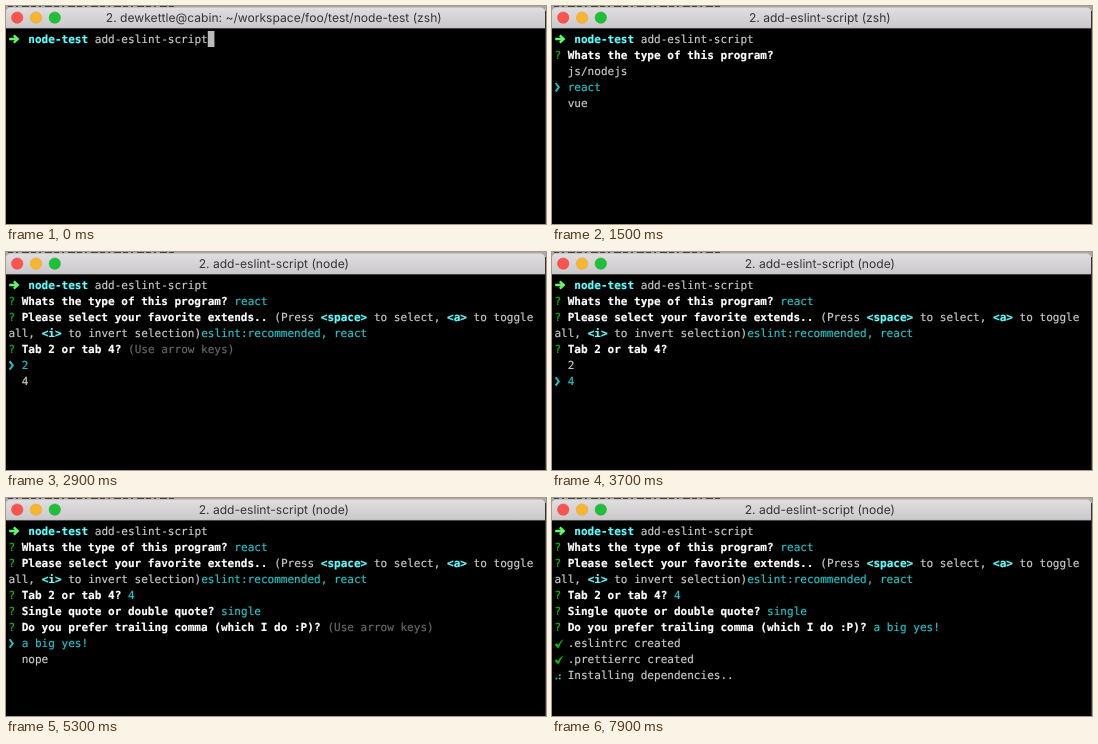
Write an HTML page that moves like this. It is 540 by 218 pixels and loops after 8 s.

```html
<!DOCTYPE html>
<html lang="en">
<head>
<meta charset="utf-8">
<title>Terminal prompt</title>
<style>
  html, body { margin: 0; width: 100%; height: 100%; overflow: hidden; background: #000; }
  svg { display: block; width: 540px; height: 218px; }
  text { white-space: pre; text-rendering: geometricPrecision; }
  #title { font: 12.1px Inter, Roboto, sans-serif; fill: #363636; text-anchor: middle; }
  #screen text {
    font: 11.04px "DejaVu Sans Mono", "Liberation Mono", monospace;
    fill: currentColor; stroke: currentColor; stroke-width: .18;
  }
  #screen .bold, #screen .path, #screen .key { font-weight: bold; }
  .plain { color: #cacaca; }
  .bold { color: #fff; }
  .dim { color: #686868; }
  .cyan { color: #20c5c9; }
  .path, .key { color: #60fdff; }
  .green { color: #00c200; }
</style>
</head>
<body>
<svg viewBox="0 0 540 218" xmlns="http://www.w3.org/2000/svg">
  <defs>
    <linearGradient id="bar" x2="0" y2="1">
      <stop offset="0" stop-color="#e0dee0"/>
      <stop offset="1" stop-color="#cac8ca"/>
    </linearGradient>
  </defs>
  <rect width="540" height="218"/>
  <rect width="540" height="6" fill="#a9a9a9"/>
  <path d="M2 .5H170" stroke="#444" stroke-dasharray="5 3 2 4 7 2"/>
  <path d="M0 22V6Q0 1.5 5 1.5H534Q539 1.5 539 6V22Z" fill="url(#bar)"/>
  <path d="M0 22.2H539" stroke="#aaa" stroke-width=".6"/>
  <path d="M539.5 5V218" stroke="#333"/>
  <g stroke-width=".5">
    <circle cx="11.2" cy="11.6" r="5.7" fill="#fb534d" stroke="#df4744"/>
    <circle cx="30" cy="11.6" r="5.7" fill="#f8b62f" stroke="#de9f34"/>
    <circle cx="48.8" cy="11.6" r="5.7" fill="#20bf38" stroke="#1fa830"/>
  </g>
  <text id="title" x="267.8" y="16.2"></text>
  <g id="screen"></g>
</svg>
<script>
const LOOP = 8000, STEP = 100;
const LEFT = 2.4, COL = 6.646, TOP = 25, ROW = 16.07, BASE = 11.8;
const SPINNER = "⠋⠙⠹⠸⠼⠴⠦⠧⠇⠏", SPIN_START = 5733, SPIN_MS = 85;

const title = document.getElementById("title");
const screen = document.getElementById("screen");

const escapeText = s => s.replace(/&/g, "&amp;").replace(/</g, "&lt;");

// Icons are drawn around the middle of their row, from the left of their cell.
const icons = {
  arrow: () => '<path d="M.8 0H8M5.4-3.6L9.4 0L5.4 3.6" fill="none" stroke="#5ffa68" stroke-width="2.3"/>',
  pointer: () => '<path d="M1.2-4.2L4.4 0L1.2 4.2" fill="none" stroke="#20c5c9" stroke-width="1.9"/>',
  checked: () => '<circle cx="6.3" r="5" fill="none" stroke="#00c200"/><circle cx="6.3" r="3.3" fill="#00c200"/>',
  empty: () => '<circle cx="6.3" r="5" fill="none" stroke="#cacaca"/>',
  tick: () => '<path d="M.4 .9Q1.6-.6 2.6 .2L3.6 1.6Q5.6-2.6 9.2-4.4Q6.2-.4 4.4 4.2H2.6Z" fill="#00c200"/>',
  cursor: () => `<rect y="-8" width="${COL}" height="16" fill="#bbb"/>`,
  spinner: t => {
    const frame = Math.floor((t - SPIN_START) / SPIN_MS) % SPINNER.length;
    const bits = SPINNER.codePointAt(frame) - 0x2800;
    let dots = "";
    for (let i = 0; i < 6; i++) {
      if (bits >> i & 1) {
        dots += `<circle cx="${2 + 3.4 * Math.floor(i / 3)}" cy="${-3.7 + 3.3 * (i % 3)}" r="1" fill="#20c5c9"/>`;
      }
    }
    return dots;
  }
};

const icon = name => ({ icon: name });
const span = (style, text) => ({ style, text });
const plain = s => span("plain", s);
const cyan = s => span("cyan", s);
const key = s => span("key", s);

const ask = (question, ...rest) => [span("green", "?"), span("bold", " " + question + " "), ...rest];
const hint = span("dim", "(Use arrow keys)");
const menu = (items, chosen) => items.map((item, i) =>
  i === chosen ? [icon("pointer"), cyan(" " + item)] : [plain("  " + item)]);
const created = file => [icon("tick"), plain(` ${file} created`)];

const prompt = [icon("arrow"), span("path", "  node-test"), plain(" add-eslint-script")];
const programs = ["js/nodejs", "react", "vue"];
const quotes = ["single", "double"];
const commas = ["a big yes!", "nope"];
const program = "Whats the type of this program?";
const tab = "Tab 2 or tab 4?";
const quote = "Single quote or double quote?";
const comma = "Do you prefer trailing comma (which I do :P)?";

const extendsRows = answer => [
  ask("Please select your favorite extends..", plain("(Press "), key("<space>"),
    plain(" to select, "), key("<a>"), plain(" to toggle")),
  [plain("all, "), key("<i>"), plain(" to invert selection)"), cyan(answer)]
];
const extendsMenu = [
  [icon("pointer"), icon("checked"), cyan(" eslint:recommended")],
  [plain(" "), icon("checked"), plain(" react")],
  [plain(" "), icon("empty"), plain(" airbnb")]
];

const withProgram = [prompt, ask(program, cyan("react"))];
const withExtends = [...withProgram, ...extendsRows("eslint:recommended, react")];
const withTab = [...withExtends, ask(tab, cyan("4"))];
const withQuote = [...withTab, ask(quote, cyan("single"))];
const withFiles = [...withQuote, ask(comma, cyan("a big yes!")),
  created(".eslintrc"), created(".prettierrc")];

const scenes = [
  [0, [[...prompt, icon("cursor")]]],
  [100, [prompt, [icon("cursor")]]],
  [500, [prompt, ask(program, hint), ...menu(programs, 0)]],
  [1100, [prompt, ask(program), ...menu(programs, 1)]],
  [1600, [...withProgram, ...extendsRows(""), ...extendsMenu]],
  [2800, [...withExtends, ask(tab, hint), ...menu(["2", "4"], 0)]],
  [3400, [...withExtends, ask(tab), ...menu(["2", "4"], 1)]],
  [3900, [...withTab, ask(quote, hint), ...menu(quotes, 0)]],
  [4900, [...withQuote, ask(comma, hint), ...menu(commas, 0)]],
  [5800, [...withFiles, [icon("cursor")]]],
  [5900, [...withFiles, [icon("spinner"), plain(" Installing dependencies..")]]]
];

function titleAt(t) {
  if (t < 100) return "2. dewkettle@cabin: ~/workspace/foo/test/node-test (zsh)";
  return `2. add-eslint-script (${t < 2800 ? "zsh" : "node"})`;
}

function drawRow(parts, row, t) {
  let col = 0, out = "";
  for (const part of parts) {
    const x = LEFT + col * COL, y = TOP + row * ROW;
    if (part.icon) {
      out += `<g transform="translate(${x} ${y + 8})">${icons[part.icon](t)}</g>`;
      col++;
    } else {
      out += `<text class="${part.style}" x="${x}" y="${y + BASE}">${escapeText(part.text)}</text>`;
      col += part.text.length;
    }
  }
  return out;
}

function draw(t) {
  const [, rows] = scenes.filter(([start]) => start <= t).pop();
  title.textContent = titleAt(t);
  screen.innerHTML = rows.map((parts, row) => drawRow(parts, row, t)).join("");
}

let shown = -1;
const began = performance.now();
function tick() {
  const elapsed = (performance.now() - began) % LOOP;
  const t = Math.floor(elapsed / STEP) * STEP;
  if (t !== shown) draw(shown = t);
  requestAnimationFrame(tick);
}
tick();
</script>
</body>
</html>
```
